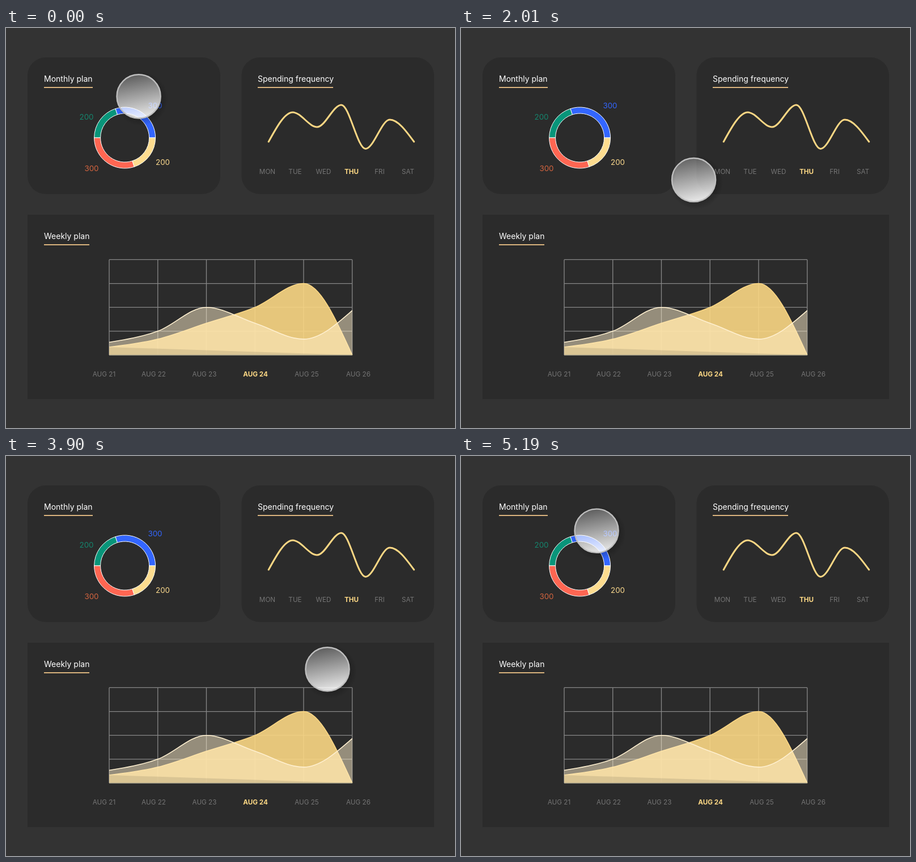
Write an HTML page that moves like this. It is 792x707 px and loops after 5220 ms.

```html
<!DOCTYPE html>
<html lang="en">
<head>
<meta charset="utf-8">
<title>Plans</title>
<style>
  html, body { margin: 0; width: 100%; height: 100%; overflow: hidden; background: #333; }
  svg { display: block; width: 792px; height: 707px; font-family: Inter, "Open Sans", sans-serif; }
  .title { font-size: 14px; fill: #fff; }
  .day { font-size: 11.7px; fill: #757575; text-anchor: middle; }
  .day.on { font-weight: 700; fill: #fbd784; }
  .amount { font-size: 13.4px; text-anchor: middle; }
  .tip { font-family: "Liberation Serif", "Times New Roman", serif; }
</style>
</head>
<body>
<svg id="stage" viewBox="0 0 792 707" xmlns="http://www.w3.org/2000/svg">
  <defs>
    <linearGradient id="glass" x1="0.42" y1="0" x2="0.62" y2="1">
      <stop offset="0" stop-color="#fff" stop-opacity="0.24"/>
      <stop offset="1" stop-color="#fff" stop-opacity="0.9"/>
    </linearGradient>
    <radialGradient id="shade" gradientUnits="userSpaceOnUse" cx="4" cy="4" r="48">
      <stop offset="0.72" stop-color="#000" stop-opacity="0.22"/>
      <stop offset="1" stop-color="#000" stop-opacity="0"/>
    </radialGradient>
  </defs>
  <g id="scene"></g>
  <g id="tips"></g>
  <g id="ball">
    <path fill="url(#shade)" fill-rule="evenodd"
      d="M-44 4a48 48 0 1 0 96 0a48 48 0 1 0 -96 0zM-39 0a39 39 0 1 0 78 0a39 39 0 1 0 -78 0z"/>
    <circle r="38.6" fill="url(#glass)" stroke="#bebebe" stroke-width="2.4"/>
  </g>
</svg>
<script>
const LOOP = 5220, MOVE = 345;
const YELLOW = '#fbd784', CREAM = '#fff0d0', CARD = '#2b2b2b';
const $ = id => document.getElementById(id);

function add(parent, tag, attrs, text) {
  const node = document.createElementNS('http://www.w3.org/2000/svg', tag);
  for (const key in attrs) node.setAttribute(key, attrs[key]);
  if (text) node.textContent = text;
  parent.appendChild(node);
  return node;
}
const scene = $('scene');
const rect = (x, y, width, height, fill, rx = 0) => add(scene, 'rect', { x, y, width, height, fill, rx });
const line = (g, x1, y1, x2, y2, stroke, width) =>
  add(g, 'line', { x1, y1, x2, y2, stroke, 'stroke-width': width });
const path = (d, attrs) => add(scene, 'path', { d, fill: 'none', ...attrs });

// Monotone cubic through evenly spaced points.
function monotone(x0, step, ys) {
  const n = ys.length;
  const s = ys.slice(1).map((y, i) => (y - ys[i]) / step);
  const m = ys.map((_, i) => {
    if (i === 0 || i === n - 1) return 0;
    const a = s[i - 1], b = s[i];
    return (Math.sign(a) + Math.sign(b)) * Math.min(Math.abs(a), Math.abs(b), Math.abs(a + b) / 4);
  });
  m[0] = (3 * s[0] - m[1]) / 2;
  m[n - 1] = (3 * s[n - 2] - m[n - 2]) / 2;
  const h = step / 3;
  let d = `M${x0} ${ys[0]}`;
  for (let i = 1; i < n; i++) {
    const x = x0 + i * step;
    d += `C${x - 2 * h} ${ys[i - 1] + m[i - 1] * h} ${x - h} ${ys[i] - m[i] * h} ${x} ${ys[i]}`;
  }
  return d;
}

function card(x, y, w, h, rx, title, tx, ty, underline) {
  rect(x, y, w, h, CARD, rx);
  add(scene, 'text', { x: tx, y: ty, class: 'title' }, title);
  rect(tx, ty + 9.3, underline, 1.7, '#f8cb8c');
}
function labels(names, active, xs, y) {
  names.forEach((name, i) =>
    add(scene, 'text', { x: xs[i], y, class: i === active ? 'day on' : 'day' }, name));
}

function donut(cx, cy, outer, inner) {
  const at = (deg, r) => {
    const a = deg * Math.PI / 180;
    return `${cx + r * Math.cos(a)} ${cy - r * Math.sin(a)}`;
  };
  const slices = [
    [0, 108, '#3366ff', 300, 263, 142, '#3366ff'],
    [108, 180, '#08957a', 200, 142, 161.5, '#15856d'],
    [180, 288, '#ff6652', 300, 151, 252.5, '#d4643f'],
    [288, 360, '#fddc8f', 200, 276.5, 241.5, '#fbd98d']
  ];
  for (const [from, to, fill, value, x, y, ink] of slices) {
    path(`M${at(from, outer)}A${outer} ${outer} 0 0 0 ${at(to, outer)}` +
      `L${at(to, inner)}A${inner} ${inner} 0 0 1 ${at(from, inner)}Z`,
      { fill, stroke: '#fff', 'stroke-width': 1 });
    add(scene, 'text', { x, y, fill: ink, class: 'amount' }, value);
  }
}

function areaChart() {
  const left = 182, right = 610.7, top = 409.4, bottom = 578, step = (right - left) / 5;
  for (let i = 0; i <= 5; i++) line(scene, left + i * step, top, left + i * step, bottom, '#888', 1.3);
  for (let i = 0; i <= 4; i++) {
    const y = top + i * (bottom - top) / 4;
    line(scene, left, y, right, y, '#888', 1.3);
  }
  const series = (values, fill, opacity, stroke) => {
    const d = monotone(left, step, values.map(v => bottom - v * (bottom - top) / 600));
    path(`${d}V${bottom}H${left}Z`, { fill, 'fill-opacity': opacity });
    path(d, { stroke, 'stroke-width': 1.6 });
  };
  series([50, 100, 200, 300, 450, 0], YELLOW, 0.9, YELLOW);
  series([80, 150, 300, 200, 100, 280], '#ffefcb', 0.5, CREAM);
  path(`M${left} 564L${right} ${bottom}H${left}Z`, { fill: CARD, 'fill-opacity': 0.12 });
  line(scene, left, bottom, right, bottom, '#aaa383', 1);
}

function tooltip(x, y, width, height, fill, size, rows) {
  const g = add($('tips'), 'g', {});
  add(g, 'rect', { x, y, width, height, fill, stroke: '#ccc', 'stroke-width': 1 });
  for (const [tx, ty, ink, text] of rows)
    add(g, 'text', { x: tx, y: ty, fill: ink, class: 'tip', 'font-size': size }, text);
  return g;
}
function cursor(g, x, y1, y2, dots) {
  line(g, x, y1, x, y2, '#d2d2d2', 1.6);
  for (const cy of dots)
    add(g, 'circle', { cx: x, cy, r: 5.4, fill: '#fbcb62', stroke: '#fff', 'stroke-width': 2.2 });
}

card(38, 52, 340, 241.5, 32, 'Monthly plan', 67, 95, 86);
card(415.5, 52, 339.5, 241.5, 32, 'Spending frequency', 444, 95, 133);
card(38, 330, 717, 326, 0, 'Weekly plan', 67, 373, 80);
donut(209.6, 194, 54, 43);
path(monotone(463.2, 42.75, [201, 149, 175, 136, 213.5, 162, 201]),
  { stroke: YELLOW, 'stroke-width': 3, 'stroke-linecap': 'round' });
labels(['MON', 'TUE', 'WED', 'THU', 'FRI', 'SAT'], 3, [461, 510, 560, 609.5, 659, 709], 257.5);
areaChart();
labels([21, 22, 23, 24, 25, 26].map(n => 'AUG ' + n), 3, [173, 260.5, 350, 440, 530.5, 621.5], 616);

const pieTip = tooltip(194.5, 240.5, 138.5, 58.5, '#ebebeb', 20, [[206.5, 276, '#222', 'Group C : 300']]);
const lineTip = tooltip(417, 117.5, 113.5, 97.5, '#fff', 24,
  [[432, 154, '#222', '40'], [432, 187.5, YELLOW, 'blue : 40']]);
cursor(lineTip, 548.7, 116, 237, [173.5]);
const areaTip = tooltip(454.8, 408.8, 98.2, 97.5, '#fff', 17,
  [[465.5, 435, '#222', 'D'], [465.5, 459, YELLOW, 'blue : 300'], [465.5, 487.5, CREAM, 'green : 200']]);
cursor(areaTip, 439, 409, 578, [493, 521]);

// Each stop: when the ball sets off towards it, where it rests, what it reveals.
const stops = [
  { start: -335, x: 233.8, y: 120.3 },
  { start: 725, x: 150, y: 243.5, tip: pieTip },
  { start: 1813, x: 566.5, y: 283.5, tip: lineTip },
  { start: 2885, x: 567.5, y: 376 },
  { start: 3885, x: 443.2, y: 592.5, tip: areaTip }
];

// cubic-bezier(.42, 0, .58, 1)
function easeInOut(t) {
  if (t >= 1) return 1;
  let lo = 0, hi = 1, u = 0.5;
  for (let i = 0; i < 24; i++) {
    u = (lo + hi) / 2;
    const x = 1.26 * u * (1 - u) ** 2 + 1.74 * u * u * (1 - u) + u ** 3;
    if (x < t) lo = u; else hi = u;
  }
  return u * u * (3 - 2 * u);
}

function draw(ms) {
  let t = ms % LOOP;
  if (t >= LOOP + stops[0].start) t -= LOOP;
  let i = stops.length - 1;
  while (t < stops[i].start) i--;
  const to = stops[i], from = stops[(i + stops.length - 1) % stops.length];
  const p = easeInOut((t - to.start) / MOVE);
  $('ball').setAttribute('transform',
    `translate(${from.x + (to.x - from.x) * p} ${from.y + (to.y - from.y) * p})`);
  for (const stop of stops)
    if (stop.tip) stop.tip.style.display = stop === to && p === 1 ? '' : 'none';
}

const began = performance.now();
function tick() {
  draw(performance.now() - began);
  requestAnimationFrame(tick);
}
tick();
</script>
</body>
</html>
```
